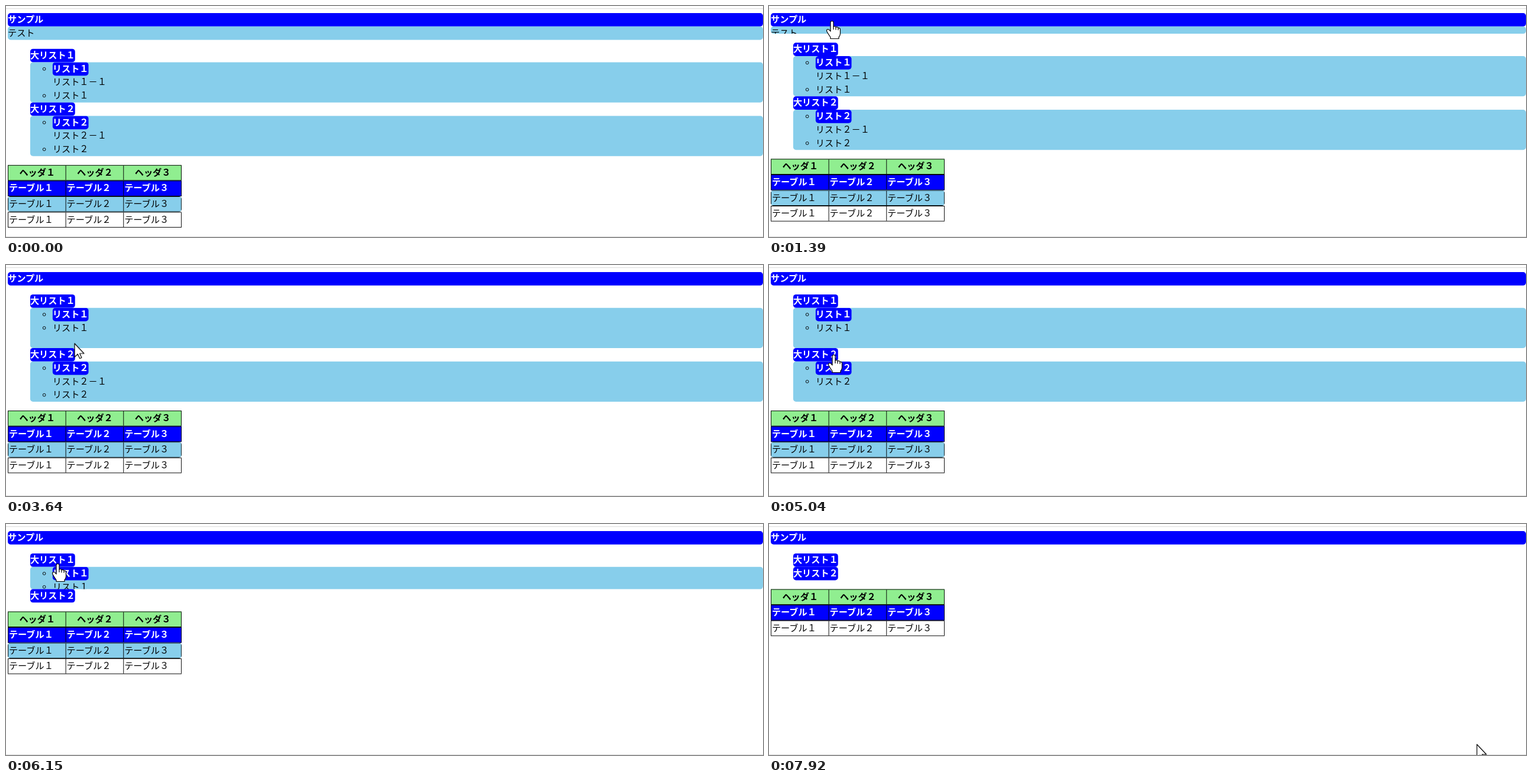
An HTML page for the animation above (8000 ms loop, 1280 px wide and 392 px high).

```html
<!DOCTYPE html>
<html lang="ja">
<head>
<meta charset="utf-8">
<title>サンプル</title>
<style>
html, body { margin: 0; width: 100%; height: 100%; overflow: hidden; background: #fff; }
body { position: relative; font: 350 16px "Noto Sans CJK JP", "Noto Sans CJK", sans-serif; color: #000; }
.rule { position: absolute; left: 0; width: 100%; height: 1px; background: #dcdcdc; }
.page {
  position: absolute; left: 3px; top: 12.3px; width: 1347px;
  transform: scale(.948); transform-origin: 0 0;
}
.line { height: 20px; line-height: 20px; padding-bottom: 4px; white-space: nowrap; }
.head { background: #00f; color: #fff; font-weight: 700; border-radius: 5px; }
.tag { width: max-content; }
.panel { background: skyblue; border-radius: 5px; overflow: hidden; }
.lists { margin: 16px 0 16px 40px; }
.lists .panel { padding-left: 40px; }
.item { position: relative; }
.item::before {
  content: ""; position: absolute; left: -18px; top: 9px;
  width: 4px; height: 4px; border: 1px solid #000; border-radius: 50%;
}
.sub { overflow: hidden; }

.row {
  display: grid; grid-template-columns: 103px 103px 104px; box-sizing: border-box;
  width: 310px; height: 28px; border: solid #000; border-width: 1px 0;
}
.row div {
  box-sizing: border-box; height: 26px; line-height: 22px;
  padding-left: 1px; border-left: 1px solid #000; white-space: nowrap;
}
.row div:last-child { border-right: 1px solid #000; }
.title { background: lightgreen; font-weight: 700; text-align: center; }
.key { background: #00f; color: #fff; font-weight: 700; }
.fold { width: 310px; }

/* Sliding panels */
.panel, .sub { animation: 8s cubic-bezier(.364, 0, .636, 1) infinite; }
.intro { animation-name: intro; }
.sub1 { animation-name: sub1; }
.sub2 { animation-name: sub2; }
.list1 { animation-name: list1; }
.list2 { animation-name: list2; }
.fold { animation-name: fold; }
@keyframes intro { 0%, 15% { height: 24px } 20%, 100% { height: 0 } }
@keyframes sub1 { 0%, 38.5% { height: 24px } 43.5%, 100% { height: 0 } }
@keyframes sub2 { 0%, 55% { height: 24px } 60%, 100% { height: 0 } }
@keyframes list2 { 0%, 64% { height: 72px } 69%, 100% { height: 0 } }
@keyframes list1 { 0%, 74.55% { height: 72px } 79.55%, 100% { height: 0 } }
@keyframes fold { 0%, 89.1% { height: 28px } 94.1%, 100% { height: 0 } }

/* Pointer */
.pointer {
  position: absolute; left: 0; top: 0; width: 1px; height: 1px; overflow: visible;
  fill: #fff; stroke: #000; stroke-width: 1.2; stroke-linejoin: round;
  animation: move 8s ease-in-out infinite;
}
.arrow { animation: arrow 8s step-end infinite; }
.hand { animation: hand 8s step-end infinite; }
@keyframes move {
  0%, 1.85% { transform: translate(1115px, 376px) }
  8.6% { transform: translate(104px, 18px) }
  10.5%, 20.5% { transform: translate(107px, 25px) }
  25.1% { transform: translate(102px, 55px) }
  26.1%, 31.4% { transform: translate(102px, 58px) }
  36.9%, 41.2% { transform: translate(118px, 77px); animation-timing-function: ease-in }
  45.5% { transform: translate(116px, 133px); animation-timing-function: ease-out }
  48.4%, 50.3% { transform: translate(114px, 164px) }
  51.25% { transform: translate(118px, 173px) }
  53.1%, 57% { transform: translate(118px, 174px) }
  61.1%, 65% { transform: translate(110px, 152px) }
  68% { transform: translate(78px, 78px) }
  72%, 78% { transform: translate(88px, 67px) }
  83.6%, 85.6% { transform: translate(156px, 152px) }
  87.5%, 92.4% { transform: translate(161px, 160px) }
  99%, 100% { transform: translate(1197px, 374px) }
}
@keyframes arrow {
  0% { opacity: 0 }
  1.85% { opacity: 1 }
  7.6% { opacity: 0 }
  22.3% { opacity: 1 }
  23.8% { opacity: 0 }
  43.6% { opacity: 1 }
  46% { opacity: 0 }
  65.9% { opacity: 1 }
  69.8% { opacity: 0 }
  79.3% { opacity: 1 }
  82.3% { opacity: 0 }
  93.2%, 100% { opacity: 1 }
}
@keyframes hand {
  0% { opacity: 0 }
  7.6% { opacity: 1 }
  22.3% { opacity: 0 }
  23.8% { opacity: 1 }
  43.6% { opacity: 0 }
  46% { opacity: 1 }
  65.9% { opacity: 0 }
  69.8% { opacity: 1 }
  79.3% { opacity: 0 }
  82.3% { opacity: 1 }
  93.2%, 100% { opacity: 0 }
}
</style>
</head>
<body>
<div class="rule" style="top:4px"></div>
<div class="rule" style="top:391px"></div>

<div class="page">
  <div class="line head">サンプル</div>
  <div class="panel intro"><div class="line">テスト</div></div>

  <div class="lists">
    <div class="line head tag">大リスト１</div>
    <div class="panel list1">
      <div class="item"><div class="line head tag">リスト１</div></div>
      <div class="sub sub1"><div class="line">リスト１－１</div></div>
      <div class="item line">リスト１</div>
    </div>
    <div class="line head tag">大リスト２</div>
    <div class="panel list2">
      <div class="item"><div class="line head tag">リスト２</div></div>
      <div class="sub sub2"><div class="line">リスト２－１</div></div>
      <div class="item line">リスト２</div>
    </div>
  </div>

  <div class="row title"><div>ヘッダ１</div><div>ヘッダ２</div><div>ヘッダ３</div></div>
  <div class="row key"><div>テーブル１</div><div>テーブル２</div><div>テーブル３</div></div>
  <div class="panel fold">
    <div class="row"><div>テーブル１</div><div>テーブル２</div><div>テーブル３</div></div>
  </div>
  <div class="row"><div>テーブル１</div><div>テーブル２</div><div>テーブル３</div></div>
</div>

<svg class="pointer">
  <path class="arrow" d="M0 0V23L5.3 18 8.8 25.5 12 24 8.6 17H16Z"/>
  <g class="hand">
    <path d="M-3 3a2.5 2.5 0 0 1 5 0V10Q5 8.5 6 11 9 9.8 10 12.5 13.5 11.5 13.5 15.5V22Q13.5 25 11 28V30.5H-3V28Q-6 24-9 18.5-10.5 15-7.5 14.5-5.5 14.5-3 18Z"/>
    <path fill="none" d="M2 10v5M6 11v4.5M10 12.5v3.5"/>
  </g>
</svg>
</body>
</html>
```
